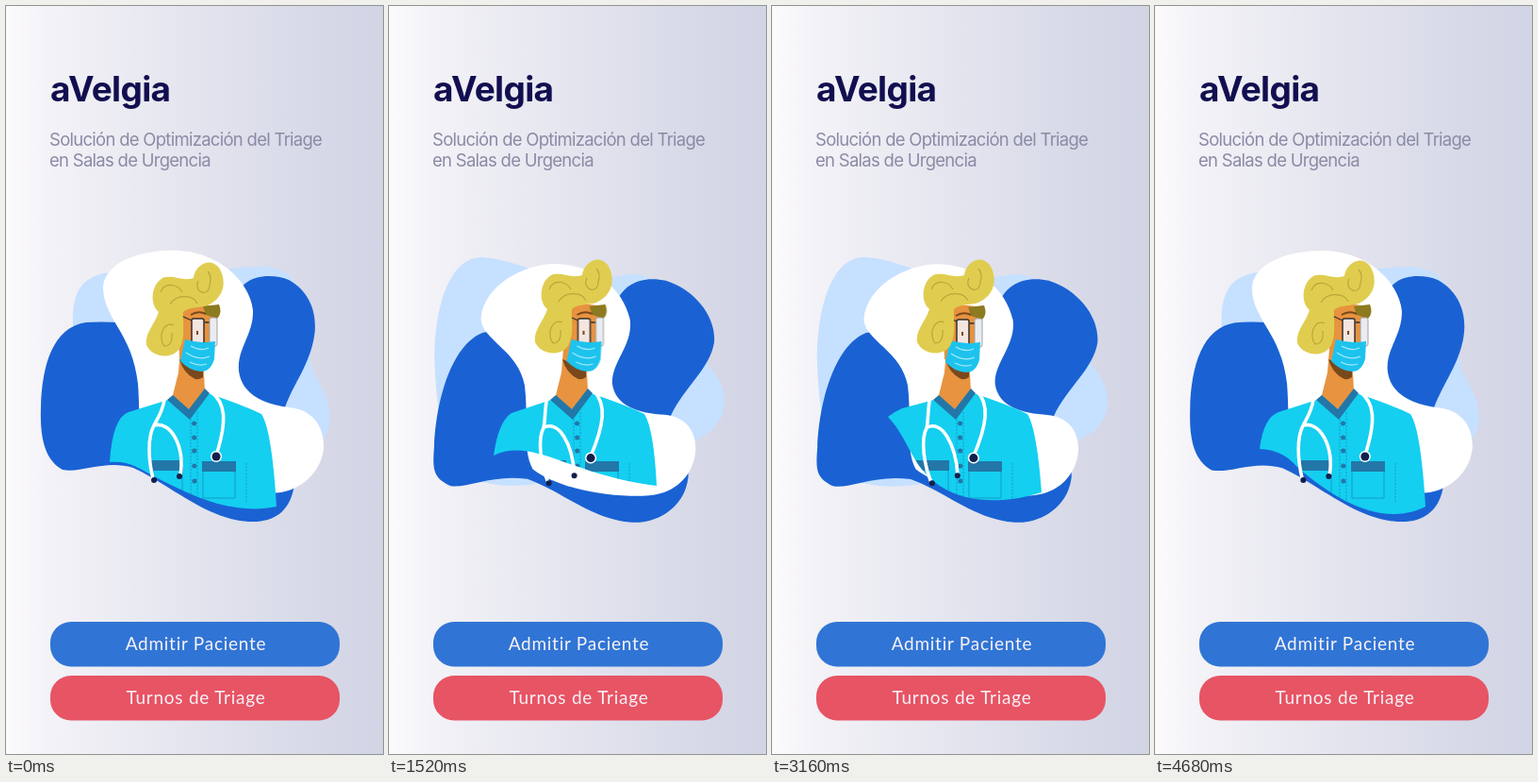
Recreate the animation shown at these times as an HTML page without scripts. Size 400 by 792 pixels, loop 4.72 s.

```html
<!DOCTYPE html>
<html lang="es">
<head>
<meta charset="utf-8">
<title>aVelgia</title>
<style>
html, body { margin: 0; width: 100%; height: 100%; overflow: hidden; }
body { background: linear-gradient(90deg, #fcfafc, #f3f2f7 12%, #e3e4ee 50%, #d6d8e7 85%, #d1d4e4); }
svg { display: block; width: 400px; height: 792px; }

.title { font: 700 37px Inter, sans-serif; letter-spacing: -.65px; fill: #120f50; }
.lead { font: 400 18.5px Inter, sans-serif; letter-spacing: -.72px; fill: #8a8aa6; }
.button { font: 400 19px Lato, sans-serif; letter-spacing: .75px; fill: #f8f2f7; text-anchor: middle; }

/* Blobs and stethoscope sway between two poses. */
.sway { animation: 2360ms cubic-bezier(.33,.35,.65,.95) infinite alternate; }
.light { fill: #c6e0ff; animation-name: light; }
.dark { fill: #1a62d3; animation-name: dark; }
.white { fill: #fff; animation-name: white; }
.tube { fill: none; stroke: #fff; stroke-width: 3.6; animation-name: tube; }
.tips { stroke: #12204d; stroke-width: 6; animation-name: tips; }
.bell { stroke: #fff; stroke-width: 12; animation-name: bell; }
.bell.core { stroke: #12204d; stroke-width: 9; }

@keyframes light {
  from { d: path("M71 330C72 290 90 282 130 280C180 285 220 280 250 277C285 272 300 282 307 292C320 330 318 375 330 395C345 420 350 445 333 462C300 485 240 490 180 485C150 480 115 440 95 400C80 385 70 360 71 330Z"); }
  to { d: path("M42 385C42 330 55 262 90 262C120 264 140 285 170 290C220 300 245 275 270 288C310 310 320 350 340 375C365 400 365 425 345 446C310 470 230 490 172 508C120 522 95 525 72 522C52 510 44 440 42 385Z"); }
}
@keyframes dark {
  from { d: path("M37 425C38 380 50 340 85 335C150 330 200 360 248 300C260 283 285 284 300 290C322 302 331 325 327 350C322 380 306 398 296 425C300 460 308 490 305 512C300 535 285 546 262 546C215 546 175 507 135 489C105 480 80 495 60 491C40 480 36 455 37 425Z"); }
  to { d: path("M51 478C53 430 70 365 103 349C160 335 200 370 243 310C255 290 275 288 292 291C325 300 352 330 350 358C346 385 315 405 300 436C305 460 321 470 321 495C318 530 285 547 262 547C220 547 185 515 150 504C110 500 85 515 67 513C48 505 49 500 51 478Z"); }
}
@keyframes white {
  from { d: path("M103 297C106 268 150 257 185 259C225 262 258 290 262 322C263 348 245 362 247 386C250 412 275 422 300 425C325 427 338 445 337 468C335 490 318 510 292 515C250 520 190 512 155 485C138 470 143 440 140 400C134 345 103 332 103 297Z"); }
  to { d: path("M96 341C98 305 140 277 175 277C215 278 245 300 254 335C258 362 234 380 234 403C237 430 268 434 290 435C312 437 323 452 322 472C320 498 300 518 272 519C230 522 175 510 152 492C142 470 150 440 145 402C138 370 98 360 96 341Z"); }
}
@keyframes tube {
  from { d: path("M168 417C166 430 161 436 157 444C150 457 151 480 156 501M157 444C174 439 190 465 185 497M217 408C233 420 235 438 223 476"); }
  to { d: path("M167 417C165 430 167 440 166 447C159 460 164 488 173 507M166 447C182 438 196 463 200 496M218 408C230 422 227 444 211 478"); }
}
@keyframes tips {
  from { d: path("M157 502h.1M184 498h.1"); }
  to { d: path("M173 506h.1M200 497h.1"); }
}
@keyframes bell {
  from { d: path("M223 477h.1"); }
  to { d: path("M211.5 479h.1"); }
}

/* The scrubs have a hem of their own. */
.hem { fill: #14cff0; animation: hem 4720ms linear infinite; }
@keyframes hem {
  0% { d: path("M172 417L130 430Q113 436 110 483C130 481 142 490 155 497C185 512 235 541 287 530Q282 448 271 432Q250 422 214 410Z"); }
  19.5% { d: path("M172 417L130 431Q115 442 110 484C124 472 135 472 150 477C175 482 225 503 285 508Q281 448 271 432Q250 422 214 410Z"); }
  32.2% { d: path("M172 417L130 431Q116 440 111 476C124 469 143 469 158 474C185 480 225 501 284 508Q281 448 271 432Q250 422 214 410Z"); }
  54.2% { d: path("M172 417L138 426Q128 429 119 437C136 448 146 468 155 485C180 524 235 525 286 514Q281 448 271 432Q250 422 214 410Z"); }
  66.9% { d: path("M172 417L138 426Q131 429 123 435C136 448 144 468 153 482C180 526 235 531 286 515Q281 448 271 432Q250 422 214 410Z"); }
  81.4% { d: path("M172 417L138 426Q128 430 119 440C136 450 146 470 155 485C185 528 235 534 285 515Q281 448 271 432Q250 422 214 410Z"); }
  99.2%, 100% { d: path("M172 417L131 430Q115 436 111 469C132 470 142 478 154 491C180 512 235 556 287 530Q282 448 271 432Q250 422 214 410Z"); }
}

.hair, .face { animation: 4720ms ease-in-out infinite; }
.hair { animation-name: hair; }
.face { animation-name: face; }
@keyframes hair {
  0% { transform: none; }
  19.5%, 32.2% { transform: translate(6px, -3px); }
  54.2% { transform: translate(4px, -3px); }
  66.9% { transform: translate(5px, -3px); }
  81.4% { transform: translate(6px, -3px); }
  99.2%, 100% { transform: translate(2px, -2px); }
}
@keyframes face {
  0% { transform: none; }
  19.5% { transform: translate(5px, -2px); }
  32.2% { transform: translate(3.5px, 0); }
  54.2% { transform: translate(-2px, 2px); }
  66.9% { transform: translate(-1px, 1px); }
  81.4% { transform: translate(5px, -2px); }
  99.2%, 100% { transform: translate(2px, 0); }
}
</style>
</head>
<body>
<svg viewBox="0 0 400 792">
  <clipPath id="scrubs"><path class="hem"/></clipPath>

  <text class="title" x="47" y="101">aVelgia</text>
  <text class="lead" x="46" y="148">Solución de Optimización del Triage</text>
  <text class="lead" x="46" y="170">en Salas de Urgencia</text>

  <path class="sway light"/>
  <path class="sway dark"/>
  <path class="sway white"/>

  <path class="hem"/>
  <g clip-path="url(#scrubs)">
    <g fill="none" stroke="#159bc7">
      <path d="M196 434V530M203 430V530M255 484V525" stroke-dasharray="2 1.5"/>
      <path d="M209 492v29h34v-29M153 492v29h34v-29"/>
    </g>
    <path d="M152 481h36v11h-36zM208 482h36v11h-36z" fill="#2277a8"/>
    <path d="M199.500 442h.1m0 15h.1m0 14h.1m0 16h.1m0 16h.1" stroke="#2277a8" stroke-width="5" stroke-linecap="round"/>
  </g>

  <path d="M186 350L183 388 176 416 193 432 211 408 208 350Z" fill="#e7933f"/>
  <path d="M184 374L209 384 209 393Q203 397 199 394Q188 388 184 374Z" fill="#7a481d"/>
  <path d="M177 412L194 427 211 405 216 410 195 438 171 417Z" fill="#2277a8"/>

  <g class="face">
    <path d="M182 322Q200 311 223 319L220 372 200 382 184 373Z" fill="#e7933f"/>
    <path d="M209 318L226 316Q230 325 224 331L212 327Z" fill="#8d7b20"/>
    <path d="M196 327Q204 322 212 326" fill="none" stroke="#7a481d" stroke-width="2"/>
    <path d="M186 328L197 333M211 335h5" fill="none" stroke="#35302f" stroke-width="1.300"/>
    <rect x="197" y="331" width="13" height="27" rx="2" fill="#f4e5df" stroke="#35302f" stroke-width="1.500"/>
    <rect x="216" y="330" width="8" height="30" rx="2" fill="#e9edf2" stroke="#a3a0a3"/>
    <path d="M203 344v4" stroke="#7a481d" stroke-width="2"/>
    <path d="M190 353Q206 358 222 355L221 374Q217 387 207 387Q194 386 185 376Z" fill="#1dc3ed"/>
    <path d="M196 360Q206 366 215 362M191 367Q204 376 216 371M195 377Q205 382 213 379" fill="none" stroke="#a6e9fb" stroke-width="1.200"/>
  </g>

  <g class="hair">
    <path d="M188 324C187 335 191 350 184 363C175 375 155 372 149 359C147 346 158 337 162 324C152 316 154 295 166 288C178 284 186 292 199 288C200 277 214 264 226 277C234 290 233 308 214 317C205 320 195 318 188 324Z" fill="#e0cd4f"/>
    <path d="M164 303C169 290 184 296 187 303M174 316C181 304 199 306 203 315M204 291C198 304 216 309 216 295Q219 287 214 281M178 338C166 333 161 352 168 360Q177 360 176 346" fill="none" stroke="#b9a63a" stroke-width="1.200"/>
  </g>

  <path class="sway tube"/>
  <g stroke-linecap="round">
    <path class="sway tips"/>
    <path class="sway bell"/>
    <path class="sway bell core"/>
  </g>

  <rect x="47" y="652" width="307" height="47.500" rx="22" fill="#3075d5"/>
  <rect x="47" y="709" width="307" height="47.500" rx="22" fill="#e75464"/>
  <text class="button" x="201.500" y="682">Admitir Paciente</text>
  <text class="button" x="201.500" y="739">Turnos de Triage</text>
</svg>
</body>
</html>
```
